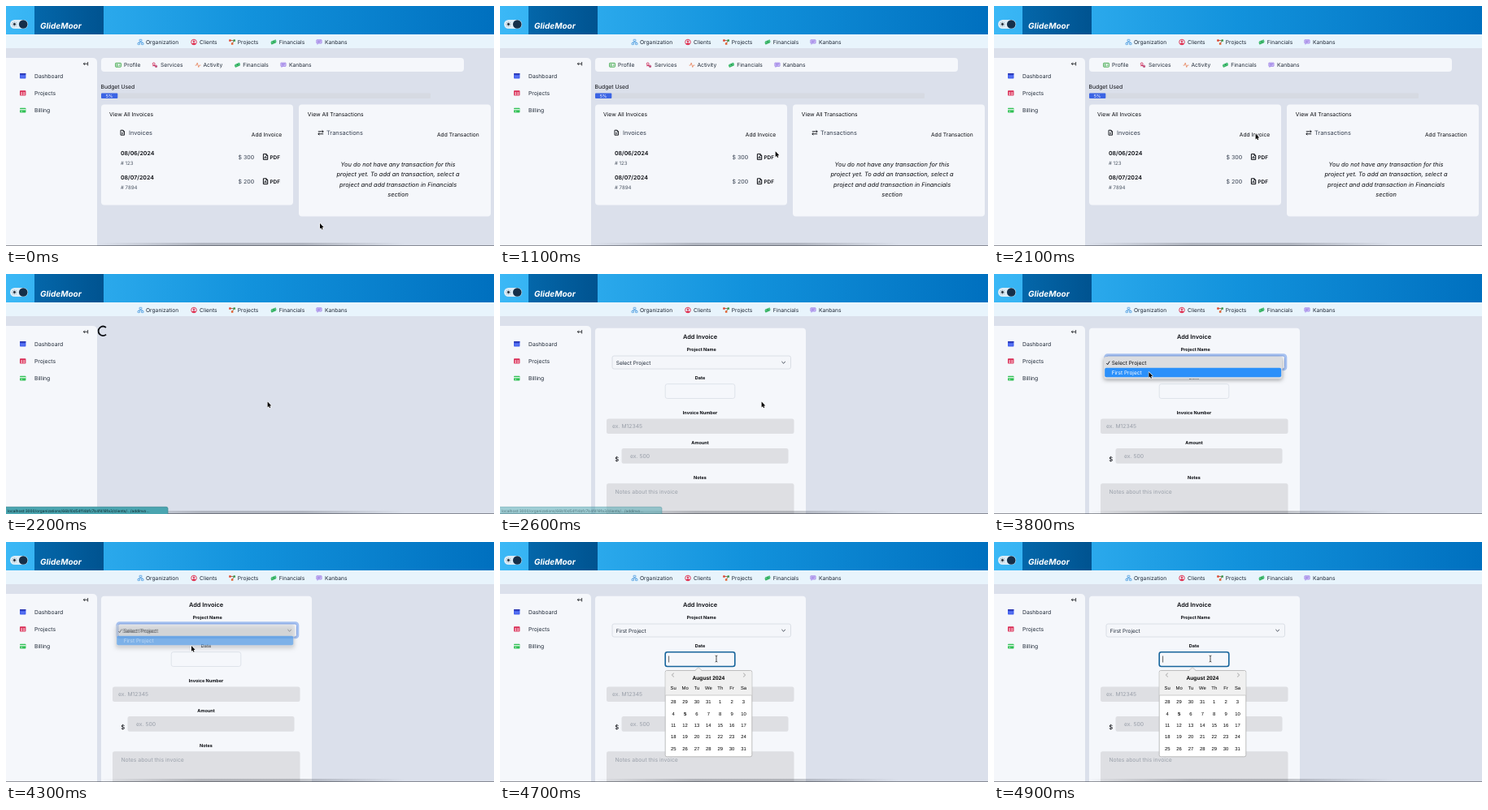
An HTML page with a canvas for the animation above (5 s loop, 600 by 296 pixels).

```html
<!DOCTYPE html>
<html lang="en">
<head>
<meta charset="utf-8">
<title>Add an invoice</title>
<style>
html, body { margin: 0; width: 100%; height: 100%; overflow: hidden; background: #dbe0eb; }
canvas { display: block; width: 600px; height: 296px; }
</style>
</head>
<body>
<canvas id="stage"></canvas>
<script>
const W = 600, H = 296, LOOP = 5000, STEP = 100;
const canvas = document.getElementById('stage');
const ratio = window.devicePixelRatio || 1;
canvas.width = Math.round(W * ratio);
canvas.height = Math.round(H * ratio);
const ctx = canvas.getContext('2d');
ctx.scale(ratio, ratio);
ctx.textRendering = 'geometricPrecision';

const UI = 'Inter, "Open Sans", sans-serif';
const ARIAL = '"Liberation Sans", Arial, sans-serif';
const CARD = '#f5f7fb', INK = '#0b0d12', SLATE = '#374151', HINT = '#9aa0aa';

// Shape and text helpers
function text(s, x, y, size = 6.8, color = INK, style = '', align = 'left', family = UI) {
  ctx.font = `${style} ${size}px ${family}`;
  ctx.textAlign = align;
  ctx.fillStyle = color;
  ctx.fillText(s, x, y);
}

function box(x, y, w, h, r, fill, stroke, width = 0.8) {
  ctx.beginPath();
  ctx.roundRect(x, y, w, h, r);
  if (fill) { ctx.fillStyle = fill; ctx.fill(); }
  if (stroke) { ctx.strokeStyle = stroke; ctx.lineWidth = width; ctx.stroke(); }
}

function line(points, color, width = 0.9) {
  ctx.beginPath();
  points.forEach(([x, y], i) => i ? ctx.lineTo(x, y) : ctx.moveTo(x, y));
  ctx.strokeStyle = color;
  ctx.lineWidth = width;
  ctx.stroke();
}

function dot(x, y, r, fill, stroke, width = 0.9) {
  ctx.beginPath();
  ctx.arc(x, y, r, 0, Math.PI * 2);
  if (fill) { ctx.fillStyle = fill; ctx.fill(); }
  if (stroke) { ctx.strokeStyle = stroke; ctx.lineWidth = width; ctx.stroke(); }
}

function gradient(x0, y0, x1, y1, ...colors) {
  const g = ctx.createLinearGradient(x0, y0, x1, y1);
  colors.forEach((c, i) => g.addColorStop(i / (colors.length - 1), c));
  return g;
}

// Icons are drawn around their centre
const icons = {
  organization() {
    const c = '#4a9be0';
    box(-1.4, -3.2, 2.8, 2.3, 0.3, null, c, 0.8);
    line([[0, -0.9], [0, 0.3]], c, 0.7);
    line([[-2.3, 1], [-2.3, 0.3], [2.3, 0.3], [2.3, 1]], c, 0.7);
    box(-3.5, 1, 2.5, 2.1, 0.3, null, c, 0.8);
    box(1, 1, 2.5, 2.1, 0.3, null, c, 0.8);
  },
  client() {
    dot(0, 0, 3.3, null, '#e02648', 0.9);
    dot(0, -0.9, 1.2, '#e02648');
    ctx.beginPath();
    ctx.arc(0, 2.9, 2.1, Math.PI, 0);
    ctx.fill();
  },
  projects() {
    line([[-2.6, -2], [2.4, -2], [0.2, 2]], '#8b5a3c', 0.8);
    box(-3.8, -3.2, 2.5, 2.5, 0.4, '#e2432f');
    box(1.5, -3.2, 2.5, 2.5, 0.4, '#3b9a52');
    box(-1.1, 0.8, 2.5, 2.5, 0.4, '#e2602f');
  },
  money() {
    ctx.rotate(-0.4);
    box(-3.5, -1.1, 6.4, 3, 0.4, '#2fae5c');
    box(-2.8, -2, 6.4, 3, 0.4, '#4cc27a');
    dot(0.4, -0.4, 0.8, '#23894a');
  },
  kanban() {
    box(-3.2, -2.8, 6.3, 4.4, 0.5, '#cdbdf5', '#9b7fe6', 0.7);
    line([[-2, -1.3], [2, -1.3]], '#8f72e0', 0.7);
    line([[-2, 0.2], [1, 0.2]], '#8f72e0', 0.7);
    line([[-1.6, 1.6], [-2.2, 3]], '#9b7fe6', 0.8);
  },
  profile() {
    box(-3.4, -2.4, 6.8, 4.8, 0.5, null, '#3aa845', 0.9);
    dot(-1.4, -0.5, 0.9, '#3aa845');
    line([[-2.4, 1.2], [-0.3, 1.2]], '#3aa845');
    line([[0.7, -0.7], [2.3, -0.7]], '#3aa845', 0.7);
    line([[0.7, 0.8], [2.3, 0.8]], '#3aa845', 0.7);
  },
  services() {
    dot(-1.3, -1.4, 1.4, null, '#d43b66', 1);
    line([[-2.8, 1], [0, 0.6], [2.6, 2.4]], '#d43b66', 1);
    dot(1.4, 1.5, 1.2, null, '#a83266', 0.9);
  },
  activity() {
    line([[-3.4, 0.3], [-1.8, 0.3], [-0.8, -2.7], [0.8, 2.7], [1.8, 0.3], [3.4, 0.3]], '#e8825a', 0.8);
  },
  dashboard() {
    box(-3.7, -3.3, 7.4, 6.6, 0.7, '#4461ee');
    box(-3.7, -3.3, 7.4, 1.8, 0.7, '#2a36b0');
    line([[-2.5, 0.8], [2.5, 0.8]], '#7d93f6', 0.7);
  },
  table() {
    box(-3.7, -3.1, 7.4, 6.2, 0.7, '#d92c55');
    for (const x of [-2.6, 0.5])
      for (const y of [-1, 1]) box(x, y, 2.2, 1.2, 0, '#fbdbe3');
  },
  card() {
    box(-3.7, -2.9, 7.4, 5.8, 0.7, '#2fc054');
    box(-3.7, -1.5, 7.4, 1.3, 0, '#e8f8ec');
    line([[-2.5, 1.5], [-0.5, 1.5]], '#e8f8ec', 0.7);
  },
  file() {
    ctx.lineJoin = 'round';
    line([[0.8, -3], [-2.2, -3], [-2.2, 3], [2.3, 3], [2.3, -1.5], [0.8, -3], [0.8, -1.4], [2.3, -1.4]], INK, 0.9);
    line([[-1, 0.2], [1.1, 0.2]], INK, 0.7);
    line([[-1, 1.6], [1.1, 1.6]], INK, 0.7);
  },
  pdf() {
    line([[1, -3.4], [-2.6, -3.4], [-2.6, 3.4], [2.7, 3.4], [2.7, -1.8], [1, -3.4], [1, -1.6], [2.7, -1.6]], INK, 1);
    line([[-1.5, 2], [0, -0.8], [1.4, 1.5], [-1.2, 1.1]], INK, 0.7);
  },
  swap() {
    line([[-3.2, -1.4], [3.2, -1.4]], INK);
    line([[1.7, -2.8], [3.2, -1.4], [1.7, 0]], INK);
    line([[3.2, 1.6], [-3.2, 1.6]], INK);
    line([[-1.7, 0.2], [-3.2, 1.6], [-1.7, 3]], INK);
  },
  collapse() {
    line([[-2.7, 0], [2, 0]], INK, 0.8);
    line([[-1.1, -1.6], [-2.7, 0], [-1.1, 1.6]], INK, 0.8);
    line([[2.6, -2.2], [2.6, 2.2]], INK, 0.8);
  }
};

function icon(name, x, y) {
  ctx.save();
  ctx.translate(x, y);
  icons[name]();
  ctx.restore();
}

function menu(items, y) {
  for (const [name, iconX, label, x] of items) {
    icon(name, iconX, y);
    text(label, x, y + 2.5, 6.7, '#1f2937');
  }
}

// Page parts
function drawFrame() {
  ctx.fillStyle = '#dbe0eb';
  ctx.fillRect(0, 0, W, H);
  ctx.fillStyle = gradient(0, 0, W, 0, '#3bb8f6', '#1292dc', '#0070bf');
  ctx.fillRect(0, 0, W, 35);
  ctx.fillStyle = gradient(35, 0, 120, 0, '#0467aa', '#005390');
  ctx.fillRect(35, 0, 85, 35);
  text('GlideMoor', 42, 28, 10, '#fff', 'italic 700');

  box(5, 17, 22, 11, 5.5, '#dcecf6');
  dot(21.2, 22.5, 5.3, '#15304a');
  dot(10.4, 22.5, 1.4, '#1c2733');
  for (let i = 0; i < 8; i++) {
    const a = i * Math.PI / 4, c = Math.cos(a), s = Math.sin(a);
    line([[10.4 + c * 2, 22.5 + s * 2], [10.4 + c * 2.8, 22.5 + s * 2.8]], '#1c2733', 0.6);
  }

  ctx.fillStyle = '#e8f4fc';
  ctx.fillRect(0, 35, W, 17);
  menu([
    ['organization', 165.5, 'Organization', 172], ['client', 231, 'Clients', 238],
    ['projects', 278, 'Projects', 284.7], ['money', 329, 'Financials', 335.7],
    ['kanban', 385, 'Kanbans', 392]
  ], 44.5);

  box(-4, 64, 116, 240, 5, CARD);
  icon('collapse', 98, 71.3);
  [['dashboard', 'Dashboard'], ['table', 'Projects'], ['card', 'Billing']].forEach(([name, label], i) => {
    const y = 86.2 + i * 21.2;
    icon(name, 20.7, y);
    text(label, 35, y + 2.5, 6.8, '#1f2937');
  });
}

function invoiceRow(date, number, amount, y) {
  text(date, 141, y, 7, INK, '600');
  text(number, 141, y + 11.3, 6.1, '#4b5563');
  text(amount, 285.5, y + 4.5, 7, SLATE);
  icon('pdf', 319, y + 1.8);
  text('PDF', 324.5, y + 4.4, 6.4, INK, '600');
}

function drawOverview() {
  box(117, 64, 446, 17, 4, CARD);
  menu([
    ['profile', 138, 'Profile', 145], ['services', 183, 'Services', 190],
    ['activity', 236, 'Activity', 242.5], ['money', 284.5, 'Financials', 291.3],
    ['kanban', 341, 'Kanbans', 348]
  ], 72.8);

  text('Budget Used', 116.5, 102.2);
  box(117, 107.5, 405, 6.6, 1, '#d6dae2');
  box(117, 107.5, 20.3, 6.6, 1, '#3b64e4');
  text('5%', 127, 112.9, 5.4, '#fff', '', 'center');

  box(117, 121.5, 236, 124, 4, CARD);
  text('View All Invoices', 127, 136.4);
  icon('file', 143.2, 156.2);
  text('Invoices', 151, 158.9, 7.4, SLATE);
  text('Add Invoice', 301.8, 161, 6.7);
  invoiceRow('08/06/2024', '# 123', '$ 300', 184.2);
  invoiceRow('08/07/2024', '# 7894', '$ 200', 214.4);

  box(360, 121.5, 236, 138, 4, CARD);
  text('View All Transactions', 370.8, 136.4);
  icon('swap', 387, 156.2);
  text('Transactions', 394, 158.9, 7.4, SLATE);
  text('Add Transaction', 530, 161, 6.7);
  [
    'You do not have any transaction for this',
    'project yet. To add an transaction, select a',
    'project and add transaction in Financials',
    'section'
  ].forEach((s, i) => text(s, 482, 197.7 + i * 12.45, 7.45, INK, 'italic', 'center'));
}

function drawSpinner(turn) {
  ctx.beginPath();
  ctx.arc(119.3, 70.4, 5.7, 0.85 + turn, 5.4 + turn);
  ctx.strokeStyle = INK;
  ctx.lineWidth = 1.8;
  ctx.stroke();
}

function label(s, y) {
  text(s, 246, y, 5.5, INK, '700', 'center');
}

function field(x, y, w, h, hint, hintX, hintY) {
  box(x, y, w, h, 2.5, '#dedfe3');
  text(hint, hintX, hintY, 6.8, HINT);
}

function drawForm(project, focus) {
  box(117, 66.7, 259, 240, 4, CARD);
  text('Add Invoice', 246, 79.6, 7.4, INK, '600', 'center');
  text('Project Name', 247.7, 95.4, 5.5, INK, '700', 'center');
  if (focus === 'select') box(136.6, 99.6, 222.4, 18.4, 3, null, '#a8c3f2', 2.6);
  box(138, 101, 219.5, 16, 2.2, '#f4f6fa', focus === 'select' ? '#6f97e4' : '#d3d8e0');
  text(project, 142.8, 111.5, 6.5, '#1f2937');
  line([[346.4, 108], [348.6, 110.2], [350.8, 108]], '#2b3340', 0.9);

  label('Date', 130.2);
  const active = focus === 'date';
  box(203.2, 135.7, 85.6, 17.8, 2.5, CARD, active ? '#17659c' : '#dde1e9', active ? 1.6 : 0.9);
  if (active) line([[207.6, 140.5], [207.6, 148.5]], '#222', 0.7);

  label('Invoice Number', 173.3);
  field(131, 178.5, 230.5, 18.5, 'ex. M12345', 138, 190.3);
  label('Amount', 210);
  text('$', 141.3, 231, 7.6, INK, '500');
  field(149.5, 215, 205, 18.7, 'ex. 500', 160, 227);
  label('Notes', 253.2);
  field(131, 258.2, 230.5, 44, 'Notes about this invoice', 141.5, 270.5);
}

function drawDropdown(alpha) {
  ctx.save();
  ctx.globalAlpha = alpha;
  ctx.shadowColor = 'rgba(0,0,0,.35)';
  ctx.shadowBlur = 5 * ratio;
  ctx.shadowOffsetY = 1.5 * ratio;
  box(135, 102, 219.5, 27.6, 3, '#dcdde0');
  ctx.shadowColor = 'transparent';
  line([[138.3, 110], [139.7, 111.7], [142.2, 107.6]], INK, 0.9);
  text('Select Project', 144.7, 111.8, 6.5);
  box(136.2, 115.8, 217, 11.4, 2, '#2b90fa');
  text('First Project', 144.7, 123.7, 6.5, '#fff');
  ctx.restore();
}

function drawCalendar() {
  box(203.2, 158.5, 106.6, 106.3, 2, '#fff', '#aeaeae');
  box(203.6, 158.9, 105.8, 30, [2, 2, 0, 0], '#f0f0f0');
  line([[203.5, 189], [309.5, 189]], '#b5b5b5', 0.7);
  ctx.beginPath();
  ctx.moveTo(239.8, 158.9);
  ctx.lineTo(244, 154.8);
  ctx.lineTo(248.2, 158.9);
  ctx.fillStyle = '#f0f0f0';
  ctx.fill();
  line([[239.8, 158.5], [244, 154.6], [248.2, 158.5]], '#aeaeae', 0.7);
  line([[213.8, 161.7], [211.4, 164.1], [213.8, 166.5]], '#bdbdbd', 1.1);
  line([[299.2, 161.7], [301.6, 164.1], [299.2, 166.5]], '#bdbdbd', 1.1);
  text('August 2024', 256.3, 169.5, 6.7, '#000', '700', 'center', ARIAL);

  const column = i => 213.2 + i * 14.38;
  'Su Mo Tu We Th Fr Sa'.split(' ').forEach((d, i) =>
    text(d, column(i), 181.7, 5.9, '#000', '', 'center', ARIAL));
  for (let i = 0; i < 35; i++) {
    const day = (i + 27) % 31 + 1;
    text(day, column(i % 7), 199.1 + Math.floor(i / 7) * 14.4, 5.9, '#000', day === 5 ? '700' : '', 'center', ARIAL);
  }
}

function drawStatus(alpha) {
  ctx.save();
  ctx.globalAlpha = alpha;
  box(-2, 287.3, 201, 11, [0, 2, 0, 0], '#4aa5b0', '#3a8793', 0.7);
  text('localhost:3000/organizations/66b10d54f14bfc7b4f418fa3/clients/.../addInvo...', 2, 293.6, 4.75, '#0c2429');
  ctx.restore();
}

function drawDockShade() {
  ctx.fillStyle = gradient(115, 0, 490, 0, 'rgba(70,75,85,0)', 'rgba(70,75,85,.28)', 'rgba(70,75,85,.28)', 'rgba(70,75,85,0)');
  ctx.fillRect(115, 292, 375, 4);
  ctx.fillStyle = 'rgba(50,55,65,.5)';
  ctx.fillRect(0, 295, W, 1);
}

// Pointer path: time, x, y
const path = [
  [0, 386, 268], [300, 342, 188], [900, 342, 188], [1500, 332, 162], [2100, 321.6, 157.6],
  [2600, 321.6, 157.6], [2700, 287, 141], [3200, 226, 109], [3400, 226, 109], [3800, 190.4, 121],
  [4000, 190.4, 121], [4300, 228, 128], [4600, 266, 144], [5000, 266, 144]
];

function pointerAt(t) {
  const i = path.findIndex(p => p[0] > t);
  const [t0, x0, y0] = path[i - 1], [t1, x1, y1] = path[i];
  const u = (t - t0) / (t1 - t0);
  return [x0 + (x1 - x0) * u, y0 + (y1 - y0) * u];
}

function drawPointer(x, y, beam) {
  ctx.save();
  ctx.translate(x, y);
  if (beam) {
    line([[0, -3.4], [0, 3.4]], '#222', 0.8);
    for (const s of [-1, 1]) line([[-1.4, 4 * s], [0, 3.3 * s], [1.4, 4 * s]], '#222', 0.7);
  } else {
    ctx.beginPath();
    ctx.moveTo(0, 0);
    for (const [px, py] of [[0, 6.8], [1.5, 5.4], [2.5, 7.7], [3.6, 7.2], [2.6, 5], [4.7, 4.9]]) ctx.lineTo(px, py);
    ctx.closePath();
    ctx.lineJoin = 'round';
    ctx.strokeStyle = '#fff';
    ctx.lineWidth = 1.1;
    ctx.stroke();
    ctx.fillStyle = '#000';
    ctx.fill();
  }
  ctx.restore();
}

function draw(t) {
  drawFrame();
  if (t < 2200) drawOverview();
  else if (t < 2400) drawSpinner((t - 2200) / 100 * 0.8);
  else {
    const focus = t >= 4700 ? 'date' : t >= 3400 ? 'select' : '';
    drawForm(t >= 4300 + STEP ? 'First Project' : 'Select Project', focus);
    if (t >= 3400 && t < 4400) drawDropdown(t < 4300 ? 1 : 0.5);
    if (t >= 4700) drawCalendar();
  }
  drawDockShade();
  if (t >= 2200 && t < 2800) drawStatus(t < 2600 ? 1 : t < 2700 ? 0.5 : 0.15);
  const [x, y] = pointerAt(t);
  drawPointer(x, y, t > 4400);
}

const start = performance.now();
function tick() {
  const t = (performance.now() - start) % LOOP;
  draw(Math.floor(t / STEP) * STEP);
  requestAnimationFrame(tick);
}
tick();
</script>
</body>
</html>
```
